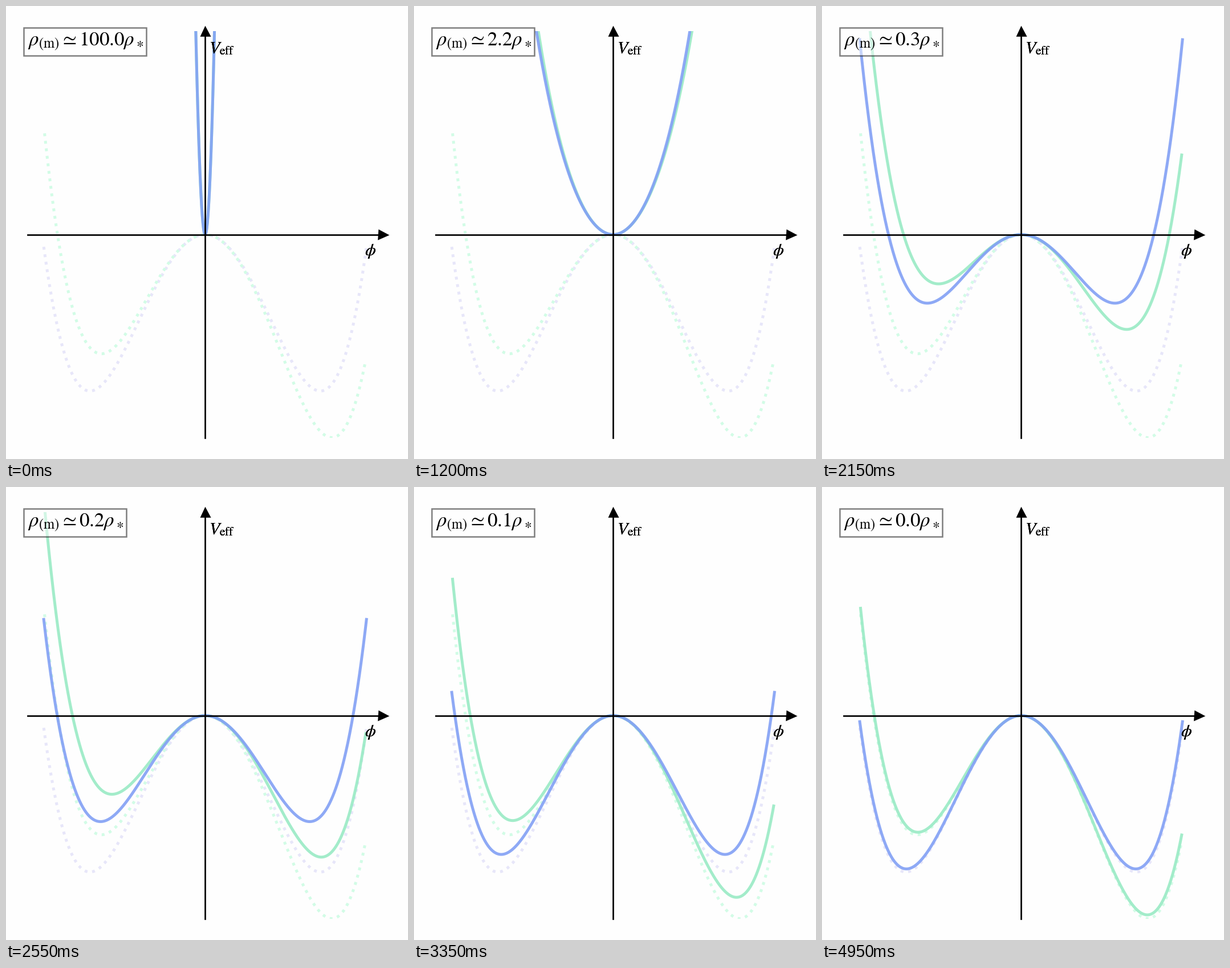
A matplotlib script that plays this animation: 705 by 794 pixels, repeating every 5 s.

```python
import numpy as np
import matplotlib.pyplot as plt
from matplotlib.animation import FuncAnimation
from matplotlib.patches import Rectangle

W, H = 705, 794
DPI = 72                      # one point equals one pixel
FRAMES, INTERVAL = 100, 50
CX, CY = 349.2, 400.6         # origin of the plot
HALF_W, HALF_H = 311.3, 356.5
SX = HALF_W / 1.54            # pixels per unit of phi
SY = HALF_H / 0.325           # pixels per unit of V
CUBIC = 0.1                   # asymmetry of the tilted potential

BLUE = (130 / 255, 160 / 255, 245 / 255)
GREEN = (153 / 255, 235 / 255, 197 / 255)
PALE_VIOLET = "#e7e6f9"
PALE_GREEN = "#d2fce6"

plt.rcParams["mathtext.fontset"] = "stix"
plt.rcParams["font.family"] = "Liberation Serif"

phi = np.linspace(-1.4, 1.4, 1001)


def potential(rho, k):
    """Pixel path of the effective potential, scaled by its vacuum size."""
    norm = 1 + k * k
    v = (rho - 1) / 2 * phi**2 - 2 * k / 3 * phi**3 + phi**4 / 4
    return CX + SX * phi / np.sqrt(norm), CY - SY * v / norm


def density(i):
    """Density falls as the inverse sixth power of a steady growth."""
    start, end = 100 ** (-1 / 6), 0.01 ** (-1 / 6)
    return (start + (end - start) * i / (FRAMES - 1)) ** -6


fig = plt.figure(figsize=(W / DPI, H / DPI), dpi=DPI, facecolor="#fefefe")
ax = fig.add_axes([0, 0, 1, 1])
ax.set_xlim(0, W)
ax.set_ylim(H, 0)
ax.axis("off")

window = Rectangle((CX - HALF_W, CY - HALF_H), 2 * HALF_W, 2 * HALF_H,
                   transform=ax.transData)


def curve(k, **style):
    line, = ax.plot(*potential(0, k), lw=5, **style)
    line.set_clip_path(window)
    return line


curve(0, color=PALE_VIOLET, ls=":")
curve(CUBIC, color=PALE_GREEN, ls=":")
tilted = curve(CUBIC, color=GREEN, alpha=0.9)
even = curve(0, color=BLUE, alpha=0.9)

# Axes with arrow heads
axis_style = dict(color="black", lw=2.7, zorder=2.5)
ax.plot([CX - HALF_W, CX + HALF_W], [CY, CY], **axis_style)
ax.plot([CX, CX], [CY - HALF_H, CY + HALF_H], **axis_style)
head = dict(color="black", ms=15, mew=2.5, zorder=2.6)
ax.plot(CX + HALF_W, CY, ">", **head)
ax.plot(CX, CY - HALF_H, "^", **head)

# Axis names, drawn repeatedly for firmer edges
for _ in range(3):
    ax.text(355.5, 82, r"$V_{\rm eff}$", fontsize=30)
    ax.text(639, 430, r"$\phi$", fontsize=30, ha="center", va="center")

# Density readout
box = ax.add_patch(Rectangle((31, 38), 180, 49, facecolor="white",
                             edgecolor="black", lw=2.5, alpha=0.5, zorder=2.9))
label = ax.text(38, 69.5, "", fontsize=35)


def update(i):
    rho = density(i)
    even.set_data(*potential(rho, 0))
    tilted.set_data(*potential(rho, CUBIC))
    value = f"{rho:.1f}"
    label.set_text(r"$\rho_{\rm (m)}\simeq %s\rho_\ast$" % value)
    box.set_width(127.5 + 17.5 * len(value))
    return even, tilted, label, box


anim = FuncAnimation(fig, update, frames=FRAMES, interval=INTERVAL, repeat=True)
plt.show()
```
